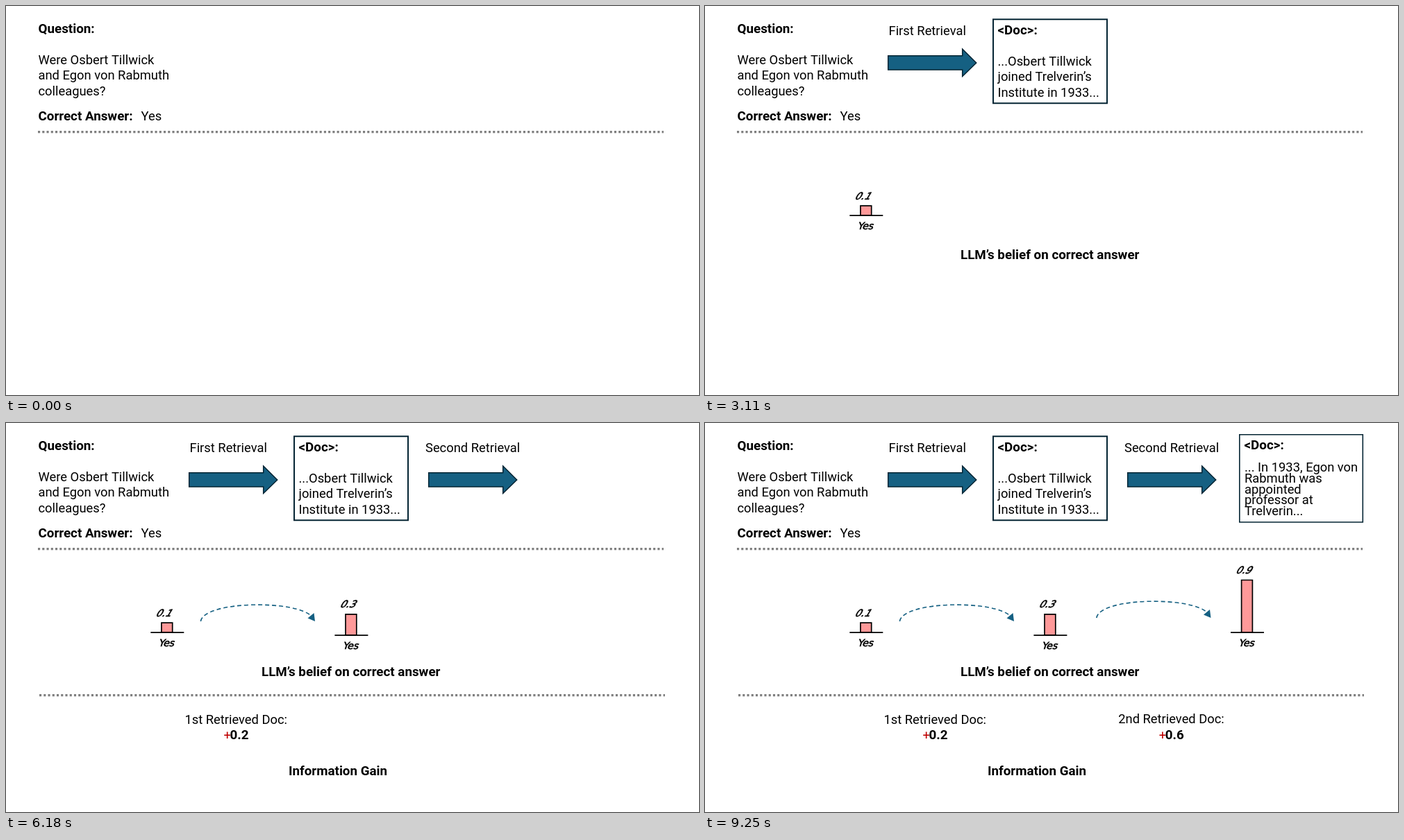
Animation of 998 by 561 pixels, one loop 9.29 s. Source, as an HTML page with a canvas:

```html
<!DOCTYPE html>
<html lang="en">
<head>
<meta charset="utf-8">
<title>Information gain</title>
<style>
  html, body { margin: 0; width: 100%; height: 100%; overflow: hidden; background: #fff; }
  canvas { display: block; width: 998px; height: 561px; }
</style>
</head>
<body>
<canvas id="stage" width="998" height="561"></canvas>
<script>
const ctx = document.getElementById('stage').getContext('2d');
const LOOP = 9290;
const TEAL = '#156082', EDGE = '#042433', PINK = '#ff9999';
const SANS = 'Roboto, "Open Sans", sans-serif';
const REGULAR = `18.35px ${SANS}`, BOLD = `bold 18.8px ${SANS}`;
const SCRIPT = '14px "DejaVu Sans", sans-serif';

function text(str, x, y, font = REGULAR, color = '#000') {
  ctx.font = font;
  ctx.fillStyle = color;
  ctx.fillText(str, x, y);
}

function lines(list, x, y, step) {
  list.forEach((str, i) => text(str, x, y + i * step));
}

// Handwritten look: leaning letters with a slightly thickened pen
function slanted(str, x, y, slant) {
  ctx.save();
  ctx.transform(1, 0, -slant, 1, x, y);
  text(str, 0, 0, SCRIPT);
  ctx.setLineDash([]);
  ctx.strokeStyle = '#000';
  ctx.lineWidth = 0.6;
  ctx.strokeText(str, 0, 0);
  ctx.restore();
}

function polygon(points) {
  ctx.beginPath();
  points.forEach(([x, y]) => ctx.lineTo(x, y));
  ctx.closePath();
}

function stroke(color, width, dash = []) {
  ctx.strokeStyle = color;
  ctx.lineWidth = width;
  ctx.setLineDash(dash);
  ctx.stroke();
}

function divider(x, y) {
  ctx.beginPath();
  ctx.moveTo(x, y);
  ctx.lineTo(x + 901, y);
  stroke('#7f7f7f', 3.1, [3.12, 3.12]);
}

function blockArrow(x) {
  polygon([[x, 71.7], [x + 107, 71.7], [x + 107, 62], [x + 127, 82],
           [x + 107, 101.5], [x + 107, 92], [x, 92]]);
  ctx.fillStyle = TEAL;
  ctx.fill();
  stroke(EDGE, 1.5);
}

function box(x, y, w, h, width) {
  ctx.beginPath();
  ctx.rect(x, y, w, h);
  stroke(EDGE, width);
}

// A belief bar standing on a short axis
function bar(x, base, height, value) {
  ctx.beginPath();
  ctx.rect(x + 15.6, base - height, 15.8, height);
  ctx.fillStyle = PINK;
  ctx.fill();
  stroke('#000', 1.7);
  ctx.beginPath();
  ctx.moveTo(x, base);
  ctx.lineTo(x + 48, base);
  stroke('#000', 1.8);
  slanted(value, x + 6.5, base - height - 9.5, 0.6);
  slanted('Yes', x + 11, base + 20, 0.3);
}

function arc(dx, dy) {
  ctx.save();
  ctx.translate(dx, dy);
  ctx.beginPath();
  ctx.moveTo(280.3, 286);
  ctx.bezierCurveTo(286, 255.5, 421, 255.5, 440, 279);
  stroke(TEAL, 1.6, [6, 4]);
  polygon([[445, 286], [434.5, 281.5], [443.5, 274]]);
  ctx.fillStyle = TEAL;
  ctx.fill();
  ctx.restore();
}

function gain(label, center, y, value) {
  ctx.textAlign = 'center';
  text(label, center, y);
  ctx.textAlign = 'left';
  text('+', center - 17.7, y + 22.3, REGULAR, '#c00000');
  text(value, center - 8.7, y + 22.3, BOLD);
}

// Each step stays visible from its start until the loop ends
const steps = [
  [0, () => {
    text('Question:', 46.5, 39, BOLD);
    lines(['Were Osbert Tillwick', 'and Egon von Rabmuth', 'colleagues?'], 46.5, 84, 22.4);
    text('Correct Answer:', 46.5, 165, BOLD);
    text('Yes', 194.5, 165);
    divider(46, 181.6);
  }],
  [1050, () => {
    bar(208.3, 302.1, 14, '0.1');
    text('LLM’s belief on correct answer', 368, 365, BOLD);
  }],
  [2060, () => {
    text('First Retrieval', 264.5, 42);
    blockArrow(263.7);
  }],
  [3110, () => {
    box(415, 19.2, 164, 121, 2);
    text('<Doc>:', 421.5, 41, BOLD);
    lines(['...Osbert Tillwick', 'joined Trelverin’s', 'Institute in 1933...'], 421.5, 86, 22.4);
  }],
  [4120, () => {
    arc(0, 0);
    bar(473.4, 306.1, 30.2, '0.3');
    divider(48, 392.6);
  }],
  [5130, () => {
    gain('1st Retrieved Doc:', 331.2, 434, '0.2');
    text('Information Gain', 407, 508, BOLD);
  }],
  [6180, () => {
    text('Second Retrieval', 604, 42);
    blockArrow(608.7);
  }],
  [7190, () => {
    box(769.8, 16.7, 177.5, 126.3, 1.6);
    text('<Doc>:', 776.5, 37.7, BOLD);
    lines(['... In 1933, Egon von', 'Rabmuth was', 'appointed', 'professor at', 'Trelverin...'], 777, 70, 15.75);
  }],
  [8240, () => {
    arc(283.5, -5);
    bar(757, 302.1, 75.6, '0.9');
  }],
  [9250, () => gain('2nd Retrieved Doc:', 671.5, 433.3, '0.6')],
];

let shown = 0;
function frame(now) {
  const t = now % LOOP;
  const active = steps.filter(([start]) => t >= start);
  if (active.length !== shown) {
    shown = active.length;
    ctx.fillStyle = '#fff';
    ctx.fillRect(0, 0, 998, 561);
    active.forEach(([, draw]) => draw());
  }
  requestAnimationFrame(frame);
}
requestAnimationFrame(frame);
</script>
</body>
</html>
```
